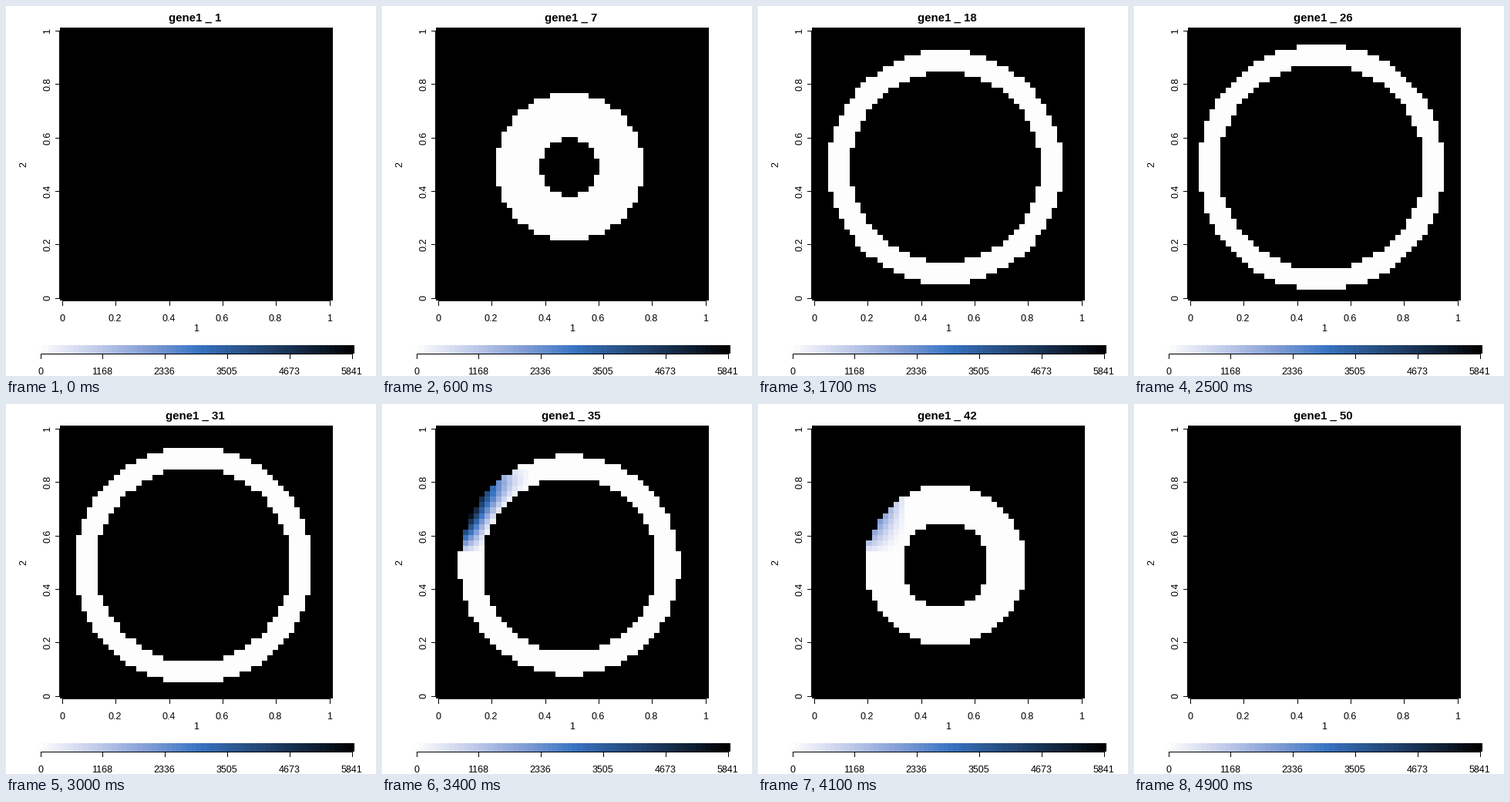
Write a matplotlib script that moves like this. It is 480 px wide and 480 px high and loops after 5000 ms.

```python
import numpy as np
import matplotlib.pyplot as plt
from matplotlib.animation import FuncAnimation
from matplotlib.colors import LinearSegmentedColormap
from matplotlib.patches import Rectangle

SIZE, DPI = 480, 100
PX = 72 / DPI
N = 50
CELL = 7.08
CENTER = 25
R_IN, R_OUT = 18.75, 22.5
V_MAX = 5841

plt.rcParams["font.family"] = "Liberation Sans"

STOPS = [(253, 253, 253), (211, 218, 240), (165, 183, 225), (117, 149, 210),
         (58, 117, 196), (44, 88, 147), (31, 61, 101), (15, 32, 54), (0, 0, 0)]
cmap = LinearSegmentedColormap.from_list("ramp", np.array(STOPS) / 255, N=256)

index = np.arange(1, N + 1)
Z, Y, X = np.meshgrid(index, index, index, indexing="ij")


def build_volume():
    """Spherical shell whose expression grows outwards inside one corner."""
    r2 = (X - CENTER) ** 2 + (Y - CENTER) ** 2 + (Z - CENTER) ** 2
    shell = (r2 >= R_IN ** 2) & (r2 <= R_OUT ** 2)
    patch = shell & (X <= 17) & (Y >= 28) & (Y <= 42) & (Z >= 34) & (Z <= 42)
    raw = (18 - X) * (X + 6) * (Y - 27) * (43 - Y) * (53 - Z) * (r2 - R_IN ** 2)
    raw = np.where(patch, raw, 0)
    return np.where(shell, V_MAX * raw / raw.max(), V_MAX)


volume = build_volume()

fig = plt.figure(figsize=(SIZE / DPI, SIZE / DPI), dpi=DPI, facecolor="white")
ax = fig.add_axes([0, 0, 1, 1])
ax.axis("off")


def bar(x, y, w, h):
    ax.add_patch(Rectangle((x, y), w, h, color="black", lw=0,
                           antialiased=False))


def label(x, y, text, size=12.5, **kw):
    return ax.text(x, y, text, size=size * PX, ha="center", va="baseline",
                   rotation_mode="anchor", **kw)


def mesh(x_edges, y_edges, values):
    return ax.pcolormesh(np.round(x_edges), np.round(y_edges), values,
                         cmap=cmap, vmin=0, vmax=V_MAX, antialiased=False,
                         edgecolors="none")


steps = np.arange(N + 1)
heat = mesh(69.7 + CELL * steps, 28.3 + CELL * steps[::-1], volume[0])
mesh(np.linspace(42, 452, 65), np.array([440, 451]),
     np.linspace(0, V_MAX, 64)[None, :])

bar(73, 382, 348, 1)
bar(69, 32, 1, 348)
for i in range(6):
    name = f"{i / 5:g}"
    x, y = int(73.2 + 69.4 * i), int(379.3 - 69.4 * i)
    bar(x, 382, 1, 7)
    label(x - .5, 409, name)
    bar(64, y, 6, 1)
    label(57, y, name, rotation=90)

bar(45, 451, 405, 1)
for i in range(6):
    x = int(45 + 80.8 * i)
    bar(x, 451, 1, 7)
    label(x - .5, 478, f"{V_MAX * i / 5:.0f}")

label(246.5, 422.5, "1")
label(26, 205.5, "2", rotation=90)
title = label(245, 20, "", size=15, weight="bold")

ax.set_xlim(0, SIZE)
ax.set_ylim(SIZE, 0)


def update(frame):
    heat.set_array(volume[frame])
    title.set_text(f"gene1 _ {frame + 1}")
    return heat, title


anim = FuncAnimation(fig, update, frames=N, interval=100, repeat=True,
                     repeat_delay=0, blit=False)
plt.show()
```
